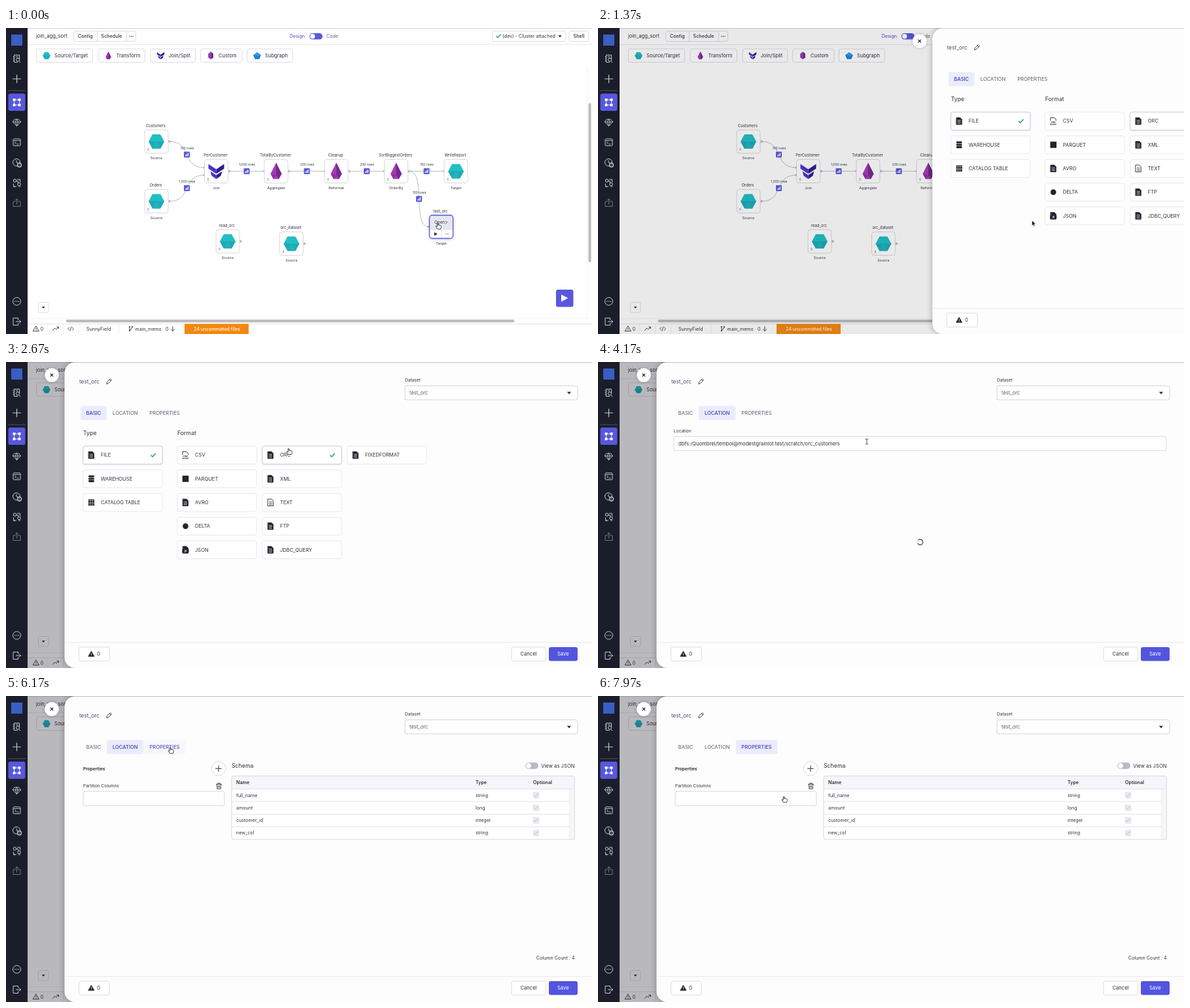
An HTML page with a canvas for the animation above (8000 ms loop, 896 by 469 pixels).

```html
<!DOCTYPE html>
<html lang="en">
<head>
<meta charset="utf-8">
<title>Pipeline editor</title>
<style>
html, body { margin: 0; width: 100%; height: 100%; overflow: hidden; background: #fff; }
canvas { display: block; width: 896px; height: 469px; }
</style>
</head>
<body>
<canvas id="stage"></canvas>
<script>
const W = 896, H = 469, LOOP = 8000;
const BLUE = '#5858de', INK = '#30323d', LINE = '#d5d6dd';
const canvas = document.getElementById('stage');
const c = canvas.getContext('2d');
const dpr = window.devicePixelRatio || 1;
canvas.width = W * dpr;
canvas.height = H * dpr;

// ---- helpers ----
function text(s, x, y, size, color = INK, align = 'left', weight = 400) {
  c.font = `${weight} ${size}px Inter, sans-serif`;
  c.textAlign = align;
  c.textBaseline = 'alphabetic';
  c.fillStyle = color;
  c.fillText(s, x, y + size * 0.36);
}

function box(x, y, w, h, r, fill, stroke, lw = 0.8) {
  c.beginPath();
  c.roundRect(x, y, w, h, r);
  paint(fill, stroke, lw);
}

function paint(fill, stroke, lw = 1) {
  if (fill) { c.fillStyle = fill; c.fill(); }
  if (stroke) { c.strokeStyle = stroke; c.lineWidth = lw; c.stroke(); }
}

function circle(x, y, r, fill, stroke, lw) {
  c.beginPath();
  c.arc(x, y, r, 0, Math.PI * 2);
  paint(fill, stroke, lw);
}

function shape(d, x, y, fill, stroke, lw, scale = 1) {
  c.save();
  c.translate(x, y);
  c.scale(scale, scale);
  const p = new Path2D(d);
  if (fill) { c.fillStyle = fill; c.fill(p); }
  if (stroke) {
    c.strokeStyle = stroke; c.lineWidth = lw;
    c.lineCap = c.lineJoin = 'round';
    c.stroke(p);
  }
  c.restore();
}

function shadow(color, blur, y = 0) {
  c.shadowColor = color;
  c.shadowBlur = blur * dpr;
  c.shadowOffsetY = y * dpr;
}

const noShadow = () => shadow('transparent', 0);
const rule = (x, y, w, h, color = LINE) => { c.fillStyle = color; c.fillRect(x, y, w, h); };
const caret = (x, y, s = 1) => shape('M-3-1.5H3L0 2Z', x, y, INK, null, 0, s);
const check = (x, y, color, s = 1) => shape('M-3 0L-1 2.2L3.2-2.4', x, y, null, color, 1.4, s);
const dots = (x, y, gap, r, color) => [-1, 0, 1].forEach(i => circle(x + i * gap, y, r, color));

function warning(x, y, solid) {
  shape('M0-4L4.4 3.6H-4.4Z', x, y, solid ? '#20222d' : null, INK, 0.9);
  rule(x - 0.4, y - 1.2, 0.9, 2.3, solid ? '#fff' : INK);
  rule(x - 0.4, y + 1.8, 0.9, 0.8, solid ? '#fff' : INK);
}

// ---- component symbols ----
const symbols = {
  hex(x, y, s) {
    shape('M-12 0L-6-11H6L12 0L6 11H-6Z', x, y, '#20bfc4', null, 0, s);
    shape('M-12 0L12 0L6 11H-6Z', x, y, '#1eaab7', null, 0, s);
    shape('M0 0L6 11H-6Z', x, y, '#22b3be', null, 0, s);
  },
  gem(x, y, s) {
    shape('M0-13L8.5 4L4 12H-4L-8.5 4Z', x, y, '#a63bb4', null, 0, s);
    shape('M0-13L8.5 4L4 12L0 6Z', x, y, '#762a90', null, 0, s);
    shape('M-8.5 4L0 6L-4 12Z', x, y, '#8c329f', null, 0, s);
  },
  vee(x, y, s) {
    shape('M-12-11L0-3V4L-12-4Z M-9 0L0 6V12L-7 7Z', x, y, '#4a35c8', null, 0, s);
    shape('M12-11L0-3V4L12-4Z M9 0L0 6V12L7 7Z', x, y, '#2b1b91', null, 0, s);
  },
  crystal(x, y, s) {
    shape('M0-12L8-6V6L0 12L-8 6V-6Z', x, y, '#9c3bb5', null, 0, s);
    shape('M0-12L8-6V6L0 12L3 0Z', x, y, '#5b2c93', null, 0, s);
  },
  penta(x, y, s) {
    shape('M0-11L12-2L7 11H-7L-12-2Z', x, y, '#2a9df0', null, 0, s);
    shape('M-12-2L0 2L12-2L7 11H-7Z', x, y, '#1b7fd6', null, 0, s);
  }
};

// ---- main screen ----
function sidebar() {
  rule(0, 0, 33, H, '#1c1d2b');
  rule(8, 10, 17, 17, '#3a5fc4');
  const g = '#c6c7d0', cx = 16.5;
  const icon = (d, y, color = g, lw = 1) => shape(d, cx, y, null, color, lw);
  icon('M4 1V-5.5H-4V5.5H1M-5.5-3H-4M-5.5 0H-4M-5.5 3H-4M-1.5-3H1.5M5.5 6L3.5 4', 47);
  circle(cx + 1.5, 48.5, 2.6, null, g, 1);
  icon('M-6 0H6M0-6V6', 78, g, 1.2);
  rule(3, 95.5, 27, 1, '#50515f');
  box(3.5, 100.5, 26, 26.5, 3, BLUE);
  icon('M-4-4H4M-4 4H4M-4-4V4M4-4V4', 114, '#fff', 0.8);
  for (const dx of [-4, 4]) for (const dy of [-4, 4]) box(cx + dx - 2, 114 + dy - 2, 4, 4, 1, '#fff');
  icon('M-3-5H3L6-1L0 5.5L-6-1ZM-6-1H6M-2-1L0 5L2-1L0-5Z', 145, g, 0.9);
  box(cx - 5.5, 170, 11, 10.5, 1.5, null, g, 1);
  icon('M-5-2.5H5M-3-.5L-1 1.2L-3 3M0 3H3', 175, g, 0.9);
  circle(cx - 0.5, 206, 5.5, null, g, 1);
  icon('M-.5-3V0L2 1', 206);
  circle(cx + 4, 210, 3, '#1c1d2b', g, 1.3);
  circle(cx + 4, 210, 0.8, g);
  for (const [x, y] of [[-5, 232], [1.5, 237.5]]) box(cx + x, y, 4, 4, 0.6, null, g, 1);
  icon('M-5 1.5V5.5H-1M1-5.5H5V-1.5M-1-3H2V0M5 5.5H3M-5 5.5H-3', 237.5);
  icon('M-2-2H-5.5V5.5H5.5V-2H2M0 2V-6M-2.5-3.8L0-6L2.5-3.8', 268, '#74757f');
  circle(cx, 419, 6, null, g, 1);
  dots(cx, 419, 2.7, 0.8, g);
  icon('M2-3V-5.5H-5.5V5.5H2V3M-1 0H6M3.8-2.3L6 0L3.8 2.3', 450);
}

function topBar() {
  rule(33, 0, W, 0.8, '#c9c9ce');
  text('join_agg_sort', 46, 12.7, 7.66);
  box(103.5, 5, 95, 15.5, 2.5, '#fff', LINE);
  rule(139, 5, 0.8, 15.5);
  rule(184, 5, 0.8, 15.5);
  text('Config', 121.3, 12.7, 7.11, INK, 'center', 500);
  text('Schedule', 161.5, 12.7, 7.11, INK, 'center', 500);
  dots(191.5, 12.7, 2.5, 0.75, INK);
  text('Design', 457, 12.7, 7.11, '#4a4ad0', 'right');
  box(464, 8, 20, 9.6, 4.8, BLUE);
  circle(468.8, 12.8, 3.7, '#fff');
  text('Code', 490, 12.7, 7.11, '#62656f');
  box(743.5, 5, 112.5, 15.5, 2.5, '#fff', LINE);
  check(753, 12.7, '#27a566');
  text('(dev) - Cluster attached', 759, 12.7, 7.2);
  caret(847, 12.7, 0.9);
  box(861, 5, 30, 15.5, 2.5, '#fff', LINE);
  text('Shell', 876, 12.7, 7.2, INK, 'center', 500);
  rule(33, 25, W, 0.8, '#e4e4e9');

  [[46.5, 86, 'Source/Target', 'hex', 15.5, 27.5], [141, 71.5, 'Transform', 'gem', 15.5, 27.5],
   [221, 68.5, 'Join/Split', 'vee', 15.5, 27.5], [297.5, 63.5, 'Custom', 'crystal', 15.5, 27.5],
   [368.5, 70, 'Subgraph', 'penta', 15.5, 27.5]].forEach(([x, w, s, sym, ix, tx]) => {
    box(x, 32, w, 20.5, 3, '#fff', LINE);
    symbols[sym](x + ix, 42.3, 0.48);
    text(s, x + tx, 42.3, 7.62);
  });
}

function statusBar() {
  rule(33, 445, W, 0.7, '#ededf0');
  rule(888, 59, 0.7, 386, '#ededf0');
  box(890.5, 115, 4.2, 244, 2.1, '#bdbdbd');
  box(91.5, 447, 686, 4.2, 2.1, '#bdbdbd');
  rule(33, 453, W, 0.8, '#dedee3');
  warning(46, 461);
  text('0', 52.8, 461, 7.4);
  shape('M-4.5 2.5L-1.5-1L.8 1L4.3-2.7M1.8-2.8H4.4V-.2', 76, 461, null, INK, 0.9);
  shape('M-2.2-2.2L-4.5 0L-2.2 2.2M2.2-2.2L4.5 0L2.2 2.2M.8-3L-.8 3', 99, 461, null, INK, 0.8);
  for (const x of [63.5, 87, 111, 172.5]) rule(x, 454, 0.7, 15, '#e9e9ee');
  text('SunnyField', 123, 461, 7.11);
  shape('M-2-2V2.5M2-2C2 1-2 0-2 2.5', 191, 461, null, INK, 0.9);
  [[-2, -3], [2, -3], [-2, 3]].forEach(([x, y]) => circle(191 + x, 461 + y, 1.1, INK));
  text('main_memo', 197.5, 461, 7.07);
  text('0', 244, 461, 7.11);
  shape('M0-3.3V3.3M-2.6.8L0 3.4L2.6.8', 255, 461, null, INK, 0.9);
  rule(273, 453.5, 98, 15.5, '#f5870f');
  text('24 uncommitted files', 322.5, 461, 7, '#fff', 'center', 500);
  box(49.5, 420.5, 15.5, 15.5, 2, '#fff', LINE);
  caret(57.2, 428.3, 0.8);
  box(841, 401, 26.5, 26.5, 3, BLUE);
  shape('M-5-5.5L5.5 0L-5 5.5Z', 854, 414, '#fff');
}

const nodes = [
  [230, 174, 'Customers', 'Source', 'hex'], [230, 265.5, 'Orders', 'Source', 'hex'],
  [321.5, 219.5, 'PerCustomer', 'Join', 'vee'], [413, 219.5, 'TotalByCustomer', 'Aggregate', 'gem'],
  [505, 219.5, 'Cleanup', 'Reformat', 'gem'], [596.5, 219.5, 'SortBiggestOrders', 'OrderBy', 'gem'],
  [688, 219.5, 'WriteReport', 'Target', 'hex'], [339, 327, 'read_orc', 'Source', 'hex'],
  [436.5, 330.5, 'orc_dataset', 'Source', 'hex'], [665.5, 305, 'test_orc', 'Target', null]
];
const edges = [
  [250, 174, 303, 214, '100 rows', 35], [250, 265.5, 303, 225.5, '1,000 rows', 35],
  [341, 219.5, 395, 219.5, '1,000 rows', 20], [433, 219.5, 487, 219.5, '200 rows', 20],
  [525, 219.5, 578, 219.5, '200 rows', 20], [616, 219.5, 670, 219.5, '100 rows', 20],
  [617, 219.5, 646, 304.5, '100 rows', 25]
];

function graph() {
  edges.forEach(([x1, y1, x2, y2, , k]) => {
    c.beginPath();
    c.moveTo(x1, y1);
    c.bezierCurveTo(x1 + k, y1, x2 - k, y2, x2, y2);
    paint(null, '#bdbdc5', 1);
    circle(x2, y2, 1.8, '#b7b7c0');
  });
  nodes.forEach(([x, y, title, kind, sym]) => {
    text(title, x - 1, y - 24.2, 5.87, INK, 'center');
    text(kind, x, y + 25.5, 5.47, INK, 'center');
    if (!sym) return openNode(x, y);
    box(x - 18, y - 18, 36, 36, 4, '#fff', '#cfd0da');
    symbols[sym](x, y, 1);
    text('0', x - 14, y + 12.5, 4.6, '#555');
    if (kind !== 'Target') shape('M-1.8-2.4L2.2 0L-1.8 2.4Z', x + 20.5, y, '#b4b4bd');
  });
  edges.forEach(([x1, y1, x2, y2, label]) => {
    const x = (x1 + x2) / 2, y = (y1 + y2) / 2;
    box(x - 4.5, y - 4.5, 9, 9, 1.2, BLUE);
    [2, 3.5, 5].forEach((h, i) => rule(x - 2.5 + i * 1.9, y + 2.5 - h, 1.2, h, '#fff'));
    text(label, x + 0.5, y - 9.8, 4.83, INK, 'center');
  });
}

function openNode(x, y) {
  shadow('rgba(70,70,180,.35)', 5, 1);
  box(x - 18, y - 18, 36, 35.5, 4, '#fff');
  noShadow();
  box(x - 18, y - 18, 36, 21.5, [4, 4, 0, 0], '#e6e8f1');
  rule(x - 18, y + 3.5, 36, 0.7);
  rule(x, y + 3.5, 0.7, 14);
  box(x - 18, y - 18, 36, 35.5, 4, null, '#5a5ad8', 1.3);
  text('Open', x - 10.5, y - 7, 6.3);
  shape('M-1-2L1 0L-1 2', x + 8, y - 7, null, INK, 0.9);
  shape('M-2.2-2.8L2.8 0L-2.2 2.8Z', x - 8.5, y + 10.7, INK);
  dots(x + 8.7, y + 10.7, 2, 0.55, INK);
}

// ---- drawer ----
const tabs = [['BASIC', 114, 40], ['LOCATION', 154, 56.5], ['PROPERTIES', 210.5, 64]];

function doc(x, y, solid = true, tag) {
  const dark = '#22242e';
  shape('M-4-5.2H1.5L4-2.7V5.2H-4Z', x, y, solid ? dark : '#fff', dark, 0.9);
  if (tag) {
    rule(x - 5, y - 0.5, 10, 4.5, solid ? dark : '#fff');
    text(tag, x, y + 1.8, 3.8, solid ? '#fff' : dark, 'center', 700);
  } else {
    [-1.5, 0.7, 2.9].forEach(d => rule(x - 2.4, y + d, 4.8, 0.7, solid ? '#fff' : dark));
  }
}

const typeIcons = {
  CSV: (x, y) => doc(x, y, false, 'csv'),
  JSON: (x, y) => doc(x, y, true, 'js'),
  TEXT: (x, y) => doc(x, y, false),
  PARQUET: (x, y) => rule(x - 4.8, y - 4.8, 9.6, 9.6, '#22242e'),
  DELTA: (x, y) => circle(x, y, 4.3, '#22242e'),
  WAREHOUSE(x, y) {
    [-3.7, 0, 3.7].forEach(d => box(x - 4.4, y + d - 1.6, 8.8, 3.1, 1.3, '#22242e'));
  },
  'CATALOG TABLE'(x, y) {
    for (let i = 0; i < 12; i++) rule(x - 4.6 + i % 3 * 3.2, y - 4.8 + (i / 3 | 0) * 2.5, 2.8, 2.1, '#22242e');
  }
};

function card(name, x, row) {
  const y = 129 + row * 36.3, on = name === 'FILE' || name === 'ORC';
  if (on) shadow('rgba(80,90,130,.28)', 3, 0.5);
  box(x, y, 121, 27.4, 3, '#fff');
  noShadow();
  box(x, y, 121, 27.4, 3, null, on ? '#c3c7d4' : '#e4e5ea');
  (typeIcons[name] || doc)(x + 12.5, y + 13.7);
  text(name, x + 27, y + 13.7, 7.58);
  if (on) check(x + 107, y + 14, '#2a9c70', 1.05);
}

function basicPage() {
  text('Type', 118, 109.3, 8.75);
  text('Format', 262, 109.3, 8.75);
  [[118, 'FILE', 'WAREHOUSE', 'CATALOG TABLE'], [262, 'CSV', 'PARQUET', 'AVRO', 'DELTA', 'JSON'],
   [392, 'ORC', 'XML', 'TEXT', 'FTP', 'JDBC_QUERY'], [522, 'FIXEDFORMAT']]
    .forEach(([x, ...names]) => names.forEach((n, i) => card(n, x, i)));
}

function locationPage(t) {
  text('Location', 116, 105.4, 6.56);
  box(116, 114, 753, 21.8, 3, '#fff', '#cfd0d8');
  text('dbfs:/Quombrel/tembol@modestgrainlot.test/scratch/orc_customers', 123, 125.2, 7.66);
  const a = (t - 4170) / 1000 * Math.PI * 2;
  circle(492.5, 276, 4.2, null, '#c9c9cf', 1.2);
  c.beginPath();
  c.arc(492.5, 276, 4.2, a - 2.2, a + 2.6);
  paint(null, '#3a3c46', 1.2);
}

function propertiesPage() {
  text('Properties', 118, 111.4, 6.6, INK, 'left', 700);
  circle(325, 111.2, 10.8, '#fff', '#cfd0d8', 0.8);
  shape('M-4.5 0H4.5M0-4.5V4.5', 325, 111.2, null, INK, 1);
  text('Partition Columns', 118, 137.8, 6.56);
  shape('M-4-2.8H4M-1.5-2.8V-4.3H1.5V-2.8M-3-2.8L-2.6 4.3H2.6L3-2.8M-1-.6V2.4M1-.6V2.4', 325.5, 138, null, INK, 0.9);
  box(118, 146.2, 216, 21.8, 3, '#fff', '#cfd0d8');
  text('Schema', 345, 107, 8.75);
  box(794, 102, 20, 9.8, 4.9, '#b7bac8');
  circle(799, 106.9, 3.8, '#fff');
  text('View as JSON', 869.5, 107, 7.66, INK, 'right');
  box(345, 122.6, 524.3, 97.2, 3, '#fff');
  box(345, 122.6, 524.3, 19.6, [3, 3, 0, 0], '#f5f6f9');
  rule(862, 142.2, 7.3, 77.4, '#f7f7f8');
  rule(861.5, 142.2, 0.7, 77.4, '#e3e4e9');
  [['Name', 352], ['Type', 718], ['Optional', 806]].forEach(([s, x]) => text(s, x, 132.3, 7.11, INK, 'left', 600));
  [['full_name', 'string'], ['amount', 'long'], ['customer_id', 'integer'], ['new_col', 'string']].forEach(([name, type], i) => {
    const y = 152 + i * 19.3;
    rule(345, y - 9.8, i ? 517 : 524, 0.8, '#dcdde4');
    text(name, 352, y, 7.11);
    text(type, 718, y, 7.11);
    box(806.3, y - 4.2, 8.4, 8.4, 1.4, '#ececf0', '#d5d6dd');
    check(810.5, y, '#c1c3cc', 0.75);
  });
  box(345, 122.6, 524.3, 97.2, 3, null, '#cfd0d8');
  text('Column Count : 4', 869.5, 401.5, 7.11, INK, 'right');
}

const T = { open: 1300, slide: 365, blur: 2300, location: 3560, properties: 6120, mark: 6260 };

function drawer(t) {
  const u = Math.min(1, (t - T.open) / T.slide);
  if (u <= 0) return;
  rule(33, 0, W, H, `rgba(15,15,30,${0.29 * Math.min(1, u * 1.6)})`);
  c.save();
  c.translate(807 * (1 - u) ** 3, 0);
  shadow('rgba(0,0,0,.3)', 10);
  box(89.5, 0.6, 830, H - 0.6, [16, 0, 0, 16], '#fdfdfe');
  shadow('rgba(0,0,0,.25)', 4);
  circle(70, 20, 10.8, '#fff');
  noShadow();
  shape('M-1.9-1.9L1.9 1.9M1.9-1.9L-1.9 1.9', 70, 20, null, '#22242e', 1.3);

  text('test_orc', 112, 29.7, 8.25, '#4c5064');
  shape('M-3.5 3.5L-3 1L2-4L4-2L-1 3ZM.7-2.7L2.7-.7', 157.5, 29.7, null, INK, 0.9);
  text('Dataset', 610, 27.7, 6.56);
  const focus = t < T.blur;
  if (focus) box(609.2, 35.7, 265.6, 23.1, 4, null, '#dcdefa', 2);
  box(610, 36.5, 264, 21.5, 3, '#fff', focus ? '#a3a6ec' : '#c9cad3', focus ? 1 : 0.8);
  text('test_orc', 617, 47.3, 7.6, '#5c5f6c');
  caret(861, 47.4, 1.05);
  if (focus && t % 1000 > 400) rule(617, 43, 0.7, 8.5, INK);

  const active = t < T.location ? 0 : t < T.mark ? 1 : 2;
  const hover = t > 5950 && t < T.mark ? 2 : t > 3350 && t < T.location ? 1 : -1;
  tabs.forEach(([s, x, w], i) => {
    if (i === active || i === hover) box(x, 67.5, w, 21.5, 3, i === active ? '#ebecfb' : '#f6f6fd');
    text(s, x + w / 2, 78.3, 7.58, i === active || i === hover ? '#3d3dbd' : '#555a6b', 'center', i === active ? 500 : 400);
  });
  if (t < T.location) basicPage();
  else if (t < T.properties) locationPage(t);
  else propertiesPage();

  rule(89.5, 429.5, 830, 0.8, '#e3e4e9');
  box(111.5, 437, 46.8, 21.3, 3, '#fff', LINE);
  warning(130.5, 447.6, true);
  text('0', 139.3, 447.6, 7.66);
  box(773, 437, 52, 21.3, 3, '#fff', LINE);
  text('Cancel', 799, 447.6, 7.66, INK, 'center');
  box(830, 437, 44, 21.3, 3, '#5355df');
  text('Save', 851.8, 447.6, 7.66, '#fff', 'center');
  c.restore();
}

// ---- pointer: time, x, y, kind from that time on ----
const path = [
  [0, 660, 299, 'hand'], [960, 660, 299, 'hand'], [1100, 663.5, 295, 'arrow'], [1850, 663.5, 295, 'arrow'],
  [2300, 500, 180, 'hand'], [2620, 432, 132.5, 'hand'], [2800, 432, 132.5, 'hand'], [3400, 186, 78, 'hand'],
  [3640, 186, 78, 'arrow'], [3980, 411, 122, 'beam'], [5350, 411, 122, 'beam'], [5500, 380, 112, 'arrow'],
  [5950, 262, 82, 'hand'], [6100, 251, 79, 'hand'], [6450, 251, 79, 'hand'], [7100, 284, 154, 'hand'], [LOOP, 284, 154, 'hand']
];

const cursors = {
  arrow: (x, y) => shape('M0 0V8.2L1.9 6.4L3.2 9.3L4.5 8.7L3.2 5.9H5.8Z', x, y, '#111', '#fff', 0.6),
  beam: (x, y) => shape('M-1.8-4C-.5-4 0-3.5 0-3V3C0 3.5-.5 4-1.8 4M1.8-4C.5-4 0-3.5 0-3M0 3C0 3.5.5 4 1.8 4', x, y, null, '#222', 0.8),
  hand: (x, y) => shape('M-1 .6C-1-.4.7-.4.7.6V3.4C1-.1 2.4 2.8 2.5 3.7C3 2.9 4 3.1 4.1 4C4.8 3.5 5.5 3.9 5.5 4.8C5.5 6.5 4.9 7 4.6 9H-.5C-1 7.6-2.4 6.5-3 5.2C-2.8 4.2-1.7 4.7-1 5.4Z', x, y, '#fff', '#1b1b1f', 0.8)
};

function pointer(t) {
  const i = path.findIndex((k, n) => n && t < k[0]);
  const [t0, x0, y0, kind] = path[i - 1], [t1, x1, y1] = path[i];
  const u = (t - t0) / (t1 - t0), e = u * u * (3 - 2 * u);
  cursors[kind](x0 + (x1 - x0) * e, y0 + (y1 - y0) * e);
}

function draw(t) {
  c.setTransform(dpr, 0, 0, dpr, 0, 0);
  rule(0, 0, W, H, '#fff');
  topBar();
  graph();
  statusBar();
  sidebar();
  drawer(t);
  pointer(t);
}

const start = performance.now();
function tick() {
  draw((performance.now() - start) % LOOP);
  requestAnimationFrame(tick);
}
tick();
</script>
</body>
</html>
```
